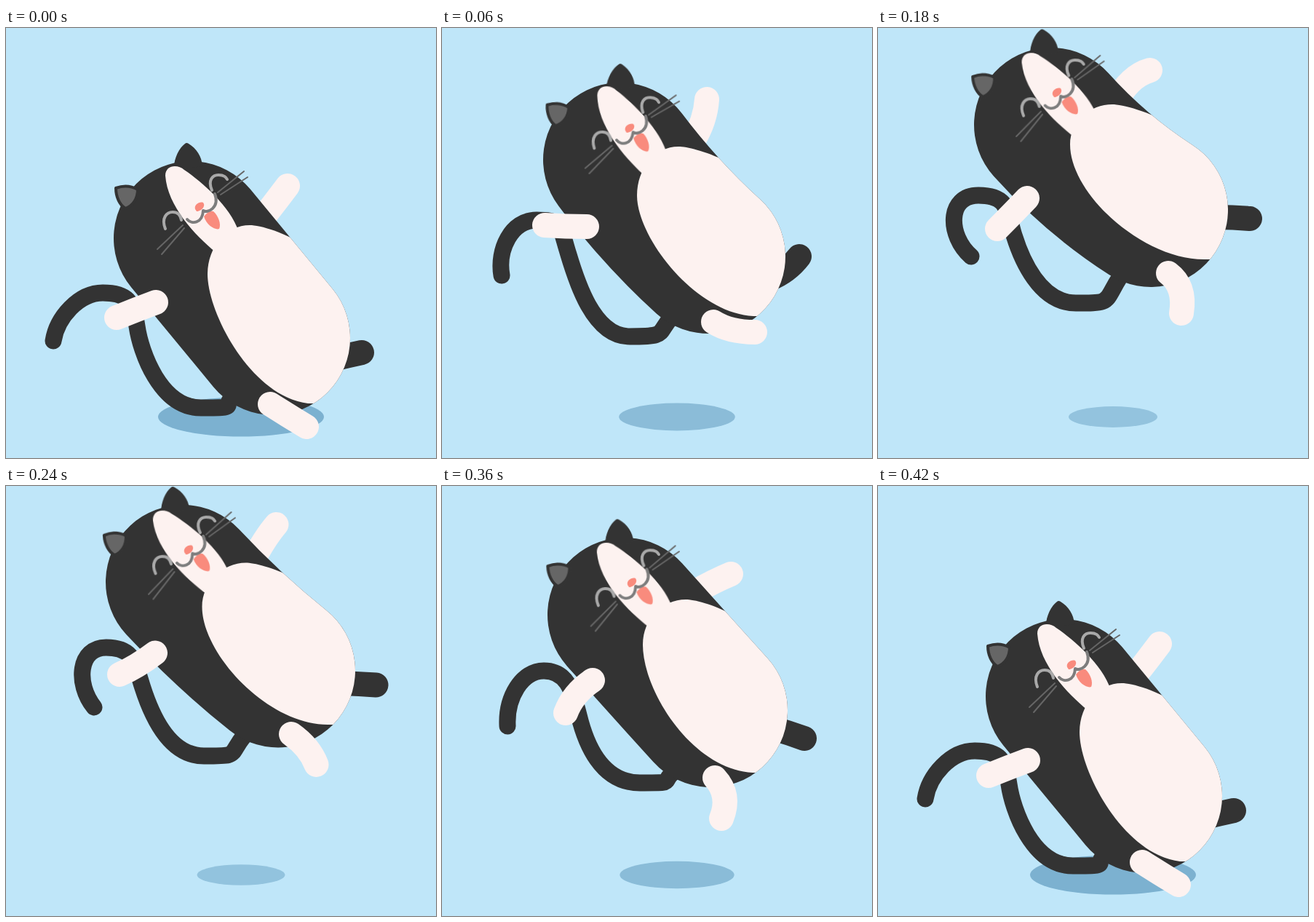
Write an HTML page without scripts that moves like this. It is 591 by 591 pixels and loops after 450 ms.

```html
<!DOCTYPE html>
<html lang="en">
<head>
<meta charset="utf-8">
<title>Jumping cat</title>
<style>
html, body { margin: 0; width: 100%; height: 100%; overflow: hidden; background: #bfe6f9; }
svg {
  display: block; width: 100%; height: 100%;
  --black: #333; --cream: #fdf2f0; --pink: #f98b7d;
  animation: hop 450ms -1ms step-end infinite;
}

/* Key poses are joined in 30 ms steps */
.tail, .body, .belly, .head, .limb { animation: 450ms -1ms steps(2) infinite; }
.tail, .body, .limb { fill: none; stroke: var(--black); stroke-linecap: round; }

.shadow {
  fill: #7cb1d0; transform-origin: 323px 534.5px;
  transform: scale(var(--size)); opacity: calc(.26 + .74 * var(--size));
}
.cat { transform: translateY(var(--lift)); }
.limb { stroke-width: 34px; }
.cream { stroke: var(--cream); }
.tail { stroke-width: 23px; animation-name: tail; }
.body { stroke-width: 212px; animation-name: body; }
.mask { stroke: #fff; }
.belly { fill: var(--cream); animation-name: belly; }
.head { transform-origin: 266px 245px; animation-name: head; }
.far-arm { animation-name: far-arm; }
.far-leg { animation-name: far-leg; }
.arm { animation-name: arm; }
.leg { animation-name: leg; }
.black { fill: var(--black); }
.white { fill: var(--cream); }
.pink { fill: var(--pink); }
.line { fill: none; stroke-linecap: round; stroke-linejoin: round; }

/* Shadow size, and the extra height that rounds off the jump */
@keyframes hop {
  0%, 93.333%, 100% { --size: 1; --lift: 0px; }
  6.667% { --size: .824; --lift: -9px; }
  13.333% { --size: .7; --lift: 0px; }
  20% { --size: .615; --lift: -5px; }
  26.667% { --size: .566; --lift: 0px; }
  33.333% { --size: .543; --lift: -3px; }
  40% { --size: .535; --lift: 0px; }
  46.667% { --size: .53; --lift: -2px; }
  53.333% { --size: .53; --lift: -4px; }
  60% { --size: .535; --lift: -3px; }
  66.667% { --size: .55; --lift: 0px; }
  73.333% { --size: .61; --lift: -4px; }
  80% { --size: .69; --lift: 0px; }
  86.667% { --size: .825; --lift: -8px; }
}
@keyframes head {
  0%, 93.333%, 100% { transform: translate(0px, 0px) rotate(0deg); }
  13.333% { transform: translate(-8px, -108px) rotate(3.2deg); }
  26.667% { transform: translate(-15px, -143px) rotate(6.3deg); }
  40% { transform: translate(-20px, -157px) rotate(-2deg); animation-timing-function: steps(4); }
  66.667% { transform: translate(-10px, -151px) rotate(-3.7deg); }
  80% { transform: translate(-5px, -113px) rotate(-1.6deg); }
}
@keyframes body {
  0%, 93.333%, 100% { d: path("M254 289Q311 358 367 426"); }
  13.333% { d: path("M245 181Q300 254 366 314"); }
  26.667% { d: path("M237 145Q289 223 367 272"); }
  40% { d: path("M238 133Q299 201 375 250"); animation-timing-function: steps(4); }
  66.667% { d: path("M248 139Q310 203 373 265"); }
  80% { d: path("M251 177Q310 243 369 308"); }
}
@keyframes belly {
  0%, 93.333%, 100% { d: path("M415 516C338 507 277 393 277 338C277 301 303 271 335 271S520 321 520 516Z"); }
  13.333% { d: path("M428 396C348 392 268 288 268 230C268 193 293 163 325 163S520 213 520 396Z"); }
  26.667% { d: path("M443 344C360 348 259 252 259 190C259 155 286 127 318 127S520 177 520 344Z"); }
  40% { d: path("M452 318C368 321 264 230 264 160C264 128 292 105 322 105S520 155 520 318Z"); animation-timing-function: steps(4); }
  66.667% { d: path("M434 346C352 344 275 240 275 180C275 145 305 114 337 114S520 164 520 346Z"); }
  80% { d: path("M427 394C345 390 276 283 276 218C276 182 303 156 335 156S520 206 520 394Z"); }
}
@keyframes tail {
  0%, 93.333%, 100% { d: path("M65 430C70 398 100 364 133 364S175 375 180 410S212 522 268 522S295 520 312 508"); }
  13.333% { d: path("M82 340C76 305 95 264 130 264S162 272 172 305S205 424 258 424S295 420 315 398"); }
  26.667% { d: path("M101 319C78 290 88 236 127 236S165 262 172 295S203 401 250 401S290 401 315 365"); }
  40% { d: path("M128 314C95 285 95 230 138 230S177 253 187 285S222 378 272 378S310 378 332 343"); animation-timing-function: steps(4); }
  66.667% { d: path("M114 302C95 265 105 222 137 222S176 238 188 275S222 372 272 372S300 372 322 352"); }
  80% { d: path("M90 330C88 290 110 254 140 254S179 278 188 315S218 408 272 408S298 408 320 392"); }
}
@keyframes far-arm {
  0%, 93.333%, 100% { d: path("M350 265Q369 241 387 217"); }
  13.333% { d: path("M345 155Q362 128 364 98"); }
  26.667% { d: path("M335 115Q348 88 360 62"); }
  40% { d: path("M325 105Q345 66 374 58"); animation-timing-function: steps(4); }
  66.667% { d: path("M350 115Q366 85 369 56"); }
  80% { d: path("M345 147Q375 130 397 121"); }
}
@keyframes far-leg {
  0%, 93.333%, 100% { d: path("M450 455Q470 450 489 446"); }
  13.333% { d: path("M450 345Q475 335 491 314"); }
  26.667% { d: path("M460 293Q480 295 503 295"); }
  40% { d: path("M465 260Q488 260 511 262"); animation-timing-function: steps(4); }
  66.667% { d: path("M460 290Q483 292 506 293"); }
  80% { d: path("M455 333Q476 339 498 347"); }
}
@keyframes arm {
  0%, 93.333%, 100% { d: path("M206 377Q179 387 152 398"); }
  13.333% { d: path("M199 273Q170 273 141 271"); }
  26.667% { d: path("M197 244Q172 259 150 280"); }
  40% { d: path("M205 234Q185 255 164 276"); animation-timing-function: steps(4); }
  66.667% { d: path("M205 233Q175 250 148 250"); }
  80% { d: path("M207 267Q180 285 170 312"); }
}
@keyframes leg {
  0%, 93.333%, 100% { d: path("M363 517Q388 533 413 548"); }
  13.333% { d: path("M373 404Q395 418 430 418"); }
  26.667% { d: path("M383 360Q410 377 436 388"); }
  40% { d: path("M399 337Q423 355 417 392"); animation-timing-function: steps(4); }
  66.667% { d: path("M385 353Q411 370 436 382"); }
  80% { d: path("M375 401Q397 425 384 457"); }
}
</style>
</head>
<body>
<svg viewBox="0 0 591 591">
  <mask id="torso" maskUnits="userSpaceOnUse" x="0" y="-50" width="591" height="691">
    <path class="body mask"/>
  </mask>

  <ellipse class="shadow" cx="323" cy="534.5" rx="114" ry="27"/>

  <g class="cat">
    <path class="tail"/>
    <path class="limb cream far-arm"/>
    <path class="limb far-leg"/>
    <path class="body"/>

    <g class="head">
      <path class="black" d="M231 195C230 180 238 165 246 159Q248 157 251 159C262 166 269 176 270 190Z"/>
      <path fill="#666" stroke="#333" stroke-width="4" stroke-linejoin="round"
        d="M151 220C162 216 172 217 181 222C181 234 175 244 164 248C156 243 151 232 151 220Z"/>
      <path class="white" d="M219 203C219 188 236 187 245 195C270 212 308 245 320 280L288 308C260 285 222 245 219 203Z"/>
      <path class="pink" d="M272 259Q279 250 285 252C292 258 296 270 293 276C288 278 276 272 272 259Z"/>
      <path class="pink" d="M260 249C258 243 266 238 271 240C275 245 268 252 262 252Z"/>
      <path class="line" stroke="#7d7d7d" stroke-width="4" d="M249 263C255 270 270 269 271 251C277 255 294 247 287 228"/>
      <g class="line" stroke="#a9a9a9" stroke-width="4">
        <path d="M219 276C213 261 221 253 229 253S240 258 241 264"/>
        <path d="M283 223C277 209 284 202 292 202S302 205 304 208"/>
      </g>
      <path class="line" stroke="#666" stroke-width="2" d="M291 226L327 197M295 229L332 205M243 271L208 304M245 275L214 311"/>
    </g>

    <g mask="url(#torso)">
      <path class="belly"/>
    </g>
    <path class="limb cream arm"/>
    <path class="limb cream leg"/>
  </g>
</svg>
</body>
</html>
```
